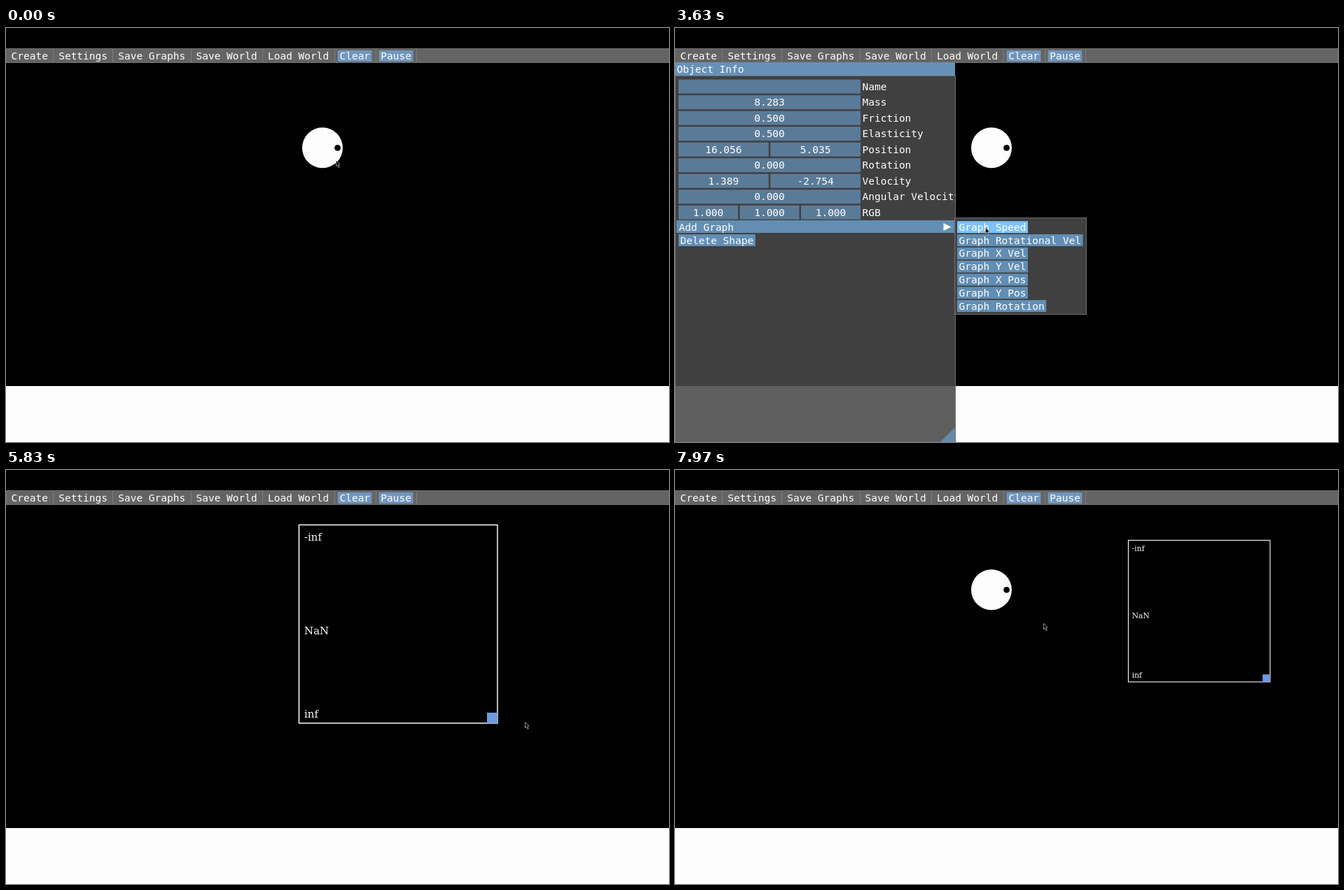
Recreate the animation shown at these times as an HTML page with a canvas. Size 947x592 px, loop 8000 ms.

```html
<!DOCTYPE html>
<html>
<head>
<meta charset="utf-8">
<style>
html, body { margin: 0; width: 100%; height: 100%; overflow: hidden; background: #000; }
canvas { display: block; }
</style>
</head>
<body>
<canvas id="stage" width="947" height="592"></canvas>
<script>
const ctx = document.getElementById('stage').getContext('2d');
const LOOP = 8000, STEP = 100 / 3;
const MONO = '14.5px "DejaVu Sans Mono", monospace';
const CHAR = 8.73;
const WHITE = '#fdfdfd', BODY = 'rgba(73,73,73,.88)', EDGE = '#6c6c74';
const FIELD = '#5a7b98', BUTTON = '#628eb3', HOT = '#7cc2fa';

// When things open, close and get dragged
const PANEL_OPEN = 930, MENU_OPEN = 1720, GRAPH_OPEN = 3680, PANEL_CLOSE = 4520;
const DRAG = 5550, RESIZE = 7080, RELEASE = 7640;

const graphStart = { x: 262, y: 76, size: 284 };
const grab = { x: 543, y: 357 };
const itemY = i => 284.7 + 18.8 * i;

const items = ['Speed', 'Rotational Vel', 'X Vel', 'Y Vel', 'X Pos', 'Y Pos', 'Rotation'];
const rows = [
  ['Name', ''], ['Mass', '8.283'], ['Friction', '0.500'], ['Elasticity', '0.500'],
  ['Position', '16.056', '5.035'], ['Rotation', '0.000'], ['Velocity', '1.389', '-2.754'],
  ['Angular Velocity', '0.000'], ['RGB', '1.000', '1.000', '1.000']
];

// Eased pointer moves; it rests between them
const home = { x: 471, y: 189 };
const moves = [
  { from: 1000, to: 1333, x: 403, y: 257 },
  { from: 1350, to: 1700, x: 374, y: itemY(0) },
  { from: 1850, to: 2433, x: 443, y: itemY(2) + 3 },
  { from: 2600, to: 3050, x: 443, y: itemY(6) },
  { from: 3200, to: 3550, x: 443, y: itemY(0) },
  { from: 4190, to: 4430, x: 608, y: 209 },
  { from: 4650, to: 5035, ...grab },
  { from: 5621, to: 5958, x: 829, y: 361 },
  { from: 6350, to: 6500, x: 919, y: 376 },
  { from: 6500, to: 6533, x: 928, y: 381 },
  { from: RESIZE, to: 7635, x: 847, y: 299 },
  { from: 7740, to: 7967, x: 526, y: 219 }
];

function pointer(t) {
  let { x, y } = home;
  for (const m of moves) {
    const u = Math.min(1, Math.max(0, (t - m.from) / (m.to - m.from)));
    const p = u * u * (3 - 2 * u);
    x += (m.x - x) * p;
    y += (m.y - y) * p;
  }
  return { x, y };
}

function box(x, y, w, h, color) {
  ctx.fillStyle = color;
  ctx.fillRect(x, y, w, h);
}

function poly(color, ...pts) {
  ctx.beginPath();
  for (let i = 0; i < pts.length; i += 2) ctx.lineTo(pts[i], pts[i + 1]);
  ctx.closePath();
  ctx.fillStyle = color;
  ctx.fill();
}

function disc(x, y, r, color) {
  ctx.beginPath();
  ctx.arc(x, y, r, 0, 2 * Math.PI);
  ctx.fillStyle = color;
  ctx.fill();
}

function frame(x, y, w, h, color, line = 1) {
  ctx.strokeStyle = color;
  ctx.lineWidth = line;
  ctx.strokeRect(x + 0.5, y + 0.5, w, h);
}

function label(text, x, mid) {
  ctx.font = MONO;
  ctx.fillStyle = '#fff';
  ctx.fillText(text, x, mid + 5);
}

function button(text, x, mid, mouse) {
  const w = text.length * CHAR + 5, y = mid - 8.5;
  const over = mouse && mouse.x >= x && mouse.x < x + w && Math.abs(mouse.y - mid) < 9;
  box(x, y, w, 17, over ? HOT : BUTTON);
  label(text, x + 2.5, mid);
}

function world() {
  box(0, 0, 947, 592, '#000');
  box(0, 512, 947, 80, WHITE);
  disc(452, 171.3, 29, WHITE);
  disc(473.6, 171.3, 4.4, '#000');
}

function graph(t) {
  let { x, y, size } = graphStart;
  if (t > DRAG) {
    const hand = pointer(Math.min(t - STEP, RESIZE));
    x += Math.round(hand.x - grab.x);
    y += Math.round(hand.y - grab.y);
  }
  if (t > RESIZE) size = Math.round(pointer(Math.min(t - STEP, RELEASE)).x + 3 - x);

  const k = size / graphStart.size;
  box(x, y, size, size, '#000');
  frame(x, y, size - 0.5, size - 0.5, WHITE, Math.max(1, 1.5 * k));
  ctx.font = `${15 * k}px "DejaVu Serif", serif`;
  ctx.fillStyle = WHITE;
  ctx.fillText('-inf', x + 8 * k, y + 22.5 * k);
  ctx.fillText('NaN', x + 8 * k, y + 156.5 * k);
  ctx.fillText('inf', x + 8 * k, y + 276 * k);
  box(x + size - 15 * k, y + size - 15 * k, 15 * k, 15 * k, '#7099dc');
}

function menuBar() {
  box(0, 29, 947, 21, '#646464');
  frame(0, 29, 947, 20, '#707070');
  let x = 7.6;
  for (const text of ['Create', 'Settings', 'Save Graphs', 'Save World', 'Load World', 'Clear', 'Pause']) {
    const w = text.length * CHAR;
    if (text === 'Clear' || text === 'Pause') box(x - 2.6, 32, w + 5, 16, '#7096bd');
    label(text, x, 40);
    box(Math.round(x + w + 7.4), 30, 1, 19, '#7c7c7c');
    x += w + 15.2;
  }
}

function panel(mouse, menuOpen) {
  box(0, 50, 400, 542, BODY);
  box(0, 49, 400, 19, '#6691b7');
  label('Object Info', 2.5, 58.5);
  ctx.save();
  ctx.beginPath();
  ctx.rect(0, 50, 400, 542);
  ctx.clip();
  rows.forEach(([name, ...values], i) => {
    const mid = 83.7 + 22.5 * i, n = values.length;
    const w = (260 - 2.5 * (n - 1)) / n;
    values.forEach((v, j) => {
      const x = 5 + j * (w + 2.5);
      box(x, mid - 10, w, 20, FIELD);
      label(v, x + (w - v.length * CHAR) / 2, mid);
    });
    label(name, 267.5, mid);
  });
  ctx.restore();
  const over = mouse.x < 399 && Math.abs(mouse.y - itemY(0)) < 9;
  if (menuOpen || over) box(2, 275, 397, 18, BUTTON);
  label('Add Graph', 5.5, itemY(0));
  poly('#fff', 383.5, 279, 394.5, 284.5, 383.5, 290);
  button('Delete Shape', 5, itemY(1));
  poly('#648ba9', 400, 571, 400, 592, 379, 592);
  frame(0, 68, 400, 540, EDGE);
}

function submenu(mouse) {
  box(399, 271, 189, 139, BODY);
  frame(399, 271, 188, 138, EDGE);
  items.forEach((name, i) => button('Graph ' + name, 403, itemY(i), mouse));
}

function arrow({ x, y }) {
  ctx.save();
  ctx.translate(Math.round(x) + 0.5, Math.round(y) + 0.5);
  poly('#000', 0, 0, 0, 8, 2, 6.4, 3.4, 10, 4.8, 9.4, 3.4, 6, 5.6, 5.6);
  ctx.strokeStyle = '#b4b4b4';
  ctx.lineWidth = 0.8;
  ctx.stroke();
  ctx.restore();
}

function draw(t) {
  const mouse = pointer(t);
  const open = t >= PANEL_OPEN && t < PANEL_CLOSE;
  const menuOpen = open && t >= MENU_OPEN;
  world();
  if (t >= GRAPH_OPEN) graph(t);
  menuBar();
  if (open) panel(mouse, menuOpen);
  if (menuOpen) submenu(mouse);
  arrow(mouse);
}

function tick() {
  const ms = performance.now() % LOOP;
  // The picture advances 30 times per second
  draw(Math.min(Math.floor((ms + 7) / STEP), 239) * STEP);
  requestAnimationFrame(tick);
}
tick();
</script>
</body>
</html>
```
